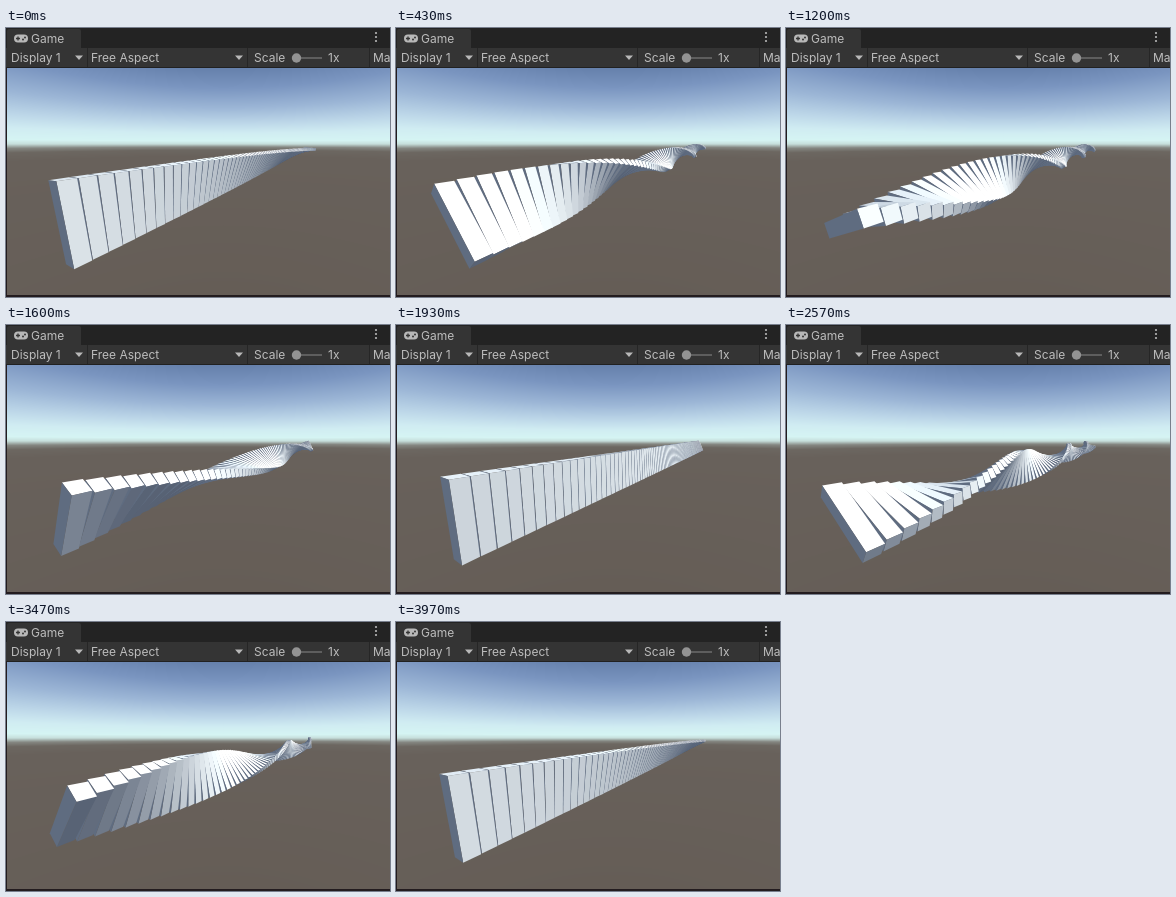
Animation, 384 px wide and 269 px high, one loop 4.01 s. Source, as an HTML page with a canvas:

```html
<!DOCTYPE html>
<html lang="en">
<head>
<meta charset="utf-8">
<title>Twisting planks</title>
<style>
  html, body { margin: 0; width: 100%; height: 100%; overflow: hidden; background: #231c1f; }
  canvas, svg { position: absolute; left: 0; top: 0; width: 384px; height: 269px; display: block; }
  text { font: 12px Inter, Roboto, sans-serif; fill: #bdbdbd; }
</style>
</head>
<body>
<canvas id="view" width="384" height="269"></canvas>
<svg viewBox="0 0 384 269">
  <rect width="384" height="20" fill="#232323"/>
  <path d="M1 20V3q0-2 2-2H73q2 0 2 2V20z" fill="#343434"/>
  <rect y="20" width="384" height="20" fill="#343434"/>
  <path d="M0 39.5H384" stroke="#212121"/>
  <path d="M81.500 20V39M241.500 20V39M363.500 20V39" stroke="#262626"/>
  <rect x="8" y="6.500" width="14" height="8" rx="4" fill="#b8b8b8"/>
  <path d="M10 10.500h4M12 8.500v4" stroke="#343434" stroke-width="1.300"/>
  <g fill="#343434"><circle cx="17" cy="11.500" r="1"/><circle cx="19" cy="9.500" r="1"/></g>
  <g fill="#b8b8b8">
    <path d="M69 27.500h8l-4 4.500zM229 27.500h8l-4 4.500z"/>
    <circle cx="370" cy="5" r="1.100"/><circle cx="370" cy="9" r="1.100"/><circle cx="370" cy="13" r="1.100"/>
  </g>
  <path d="M290 30H316" stroke="#5e5e5e" stroke-width="2"/>
  <circle cx="290.500" cy="30" r="4.700" fill="#939393"/>
  <text x="25" y="15">Game</text>
  <text x="5" y="34">Display 1</text>
  <text x="85" y="34">Free Aspect</text>
  <text x="248" y="34">Scale</text>
  <text x="322" y="34">1x</text>
  <text x="367" y="34">Maximize</text>
</svg>
<script>
const ctx = document.getElementById('view').getContext('2d');
const LOOP = 4010, FRAMES = 120, COUNT = 100;
const LENGTH = 5, THICK = 1, DEPTH = 0.94;

// Camera: focal length and centre in pixels, row vanishing point, near end of the row
const focal = 197, cx = 217.5, cy = 153, horizon = 116;
const vanish = [336, 111], near = [55.5, 197.5], nearZ = 10.8;

const dot = (a, b) => a[0] * b[0] + a[1] * b[1] + a[2] * b[2];
const cross = (a, b) => [a[1] * b[2] - a[2] * b[1], a[2] * b[0] - a[0] * b[2], a[0] * b[1] - a[1] * b[0]];
const unit = a => a.map(v => v / Math.hypot(...a));
const mix = (a, s, b, t) => a.map((v, i) => v * s + b[i] * t);
const add = (a, b, s) => mix(a, 1, b, s);
const ray = ([x, y]) => [(x - cx) / focal, (y - cy) / focal, 1];
const project = p => [cx + focal * p[0] / p[2], cy + focal * p[1] / p[2]];

const row = unit(ray(vanish));
const down = unit([0, focal, cy - vanish[1]]);
const side = cross(down, row);
const origin = ray(near).map(v => v * nearZ);

// Colours down the middle column; elsewhere the colour follows the elevation of the view ray
const sky = [
  [40, 101, 128, 171], [60, 122, 149, 192], [80, 156, 182, 214], [95, 188, 214, 232], [105, 208, 236, 242],
  [113, 213, 244, 243], [116, 198, 222, 219], [119, 132, 134, 129], [122, 108, 103, 97], [128, 104, 97, 91],
  [267, 101, 93, 86]
];

function skyColor(y) {
  const i = Math.max(1, sky.findIndex(stop => stop[0] >= y));
  const [a, b] = [sky[i - 1], sky[i]];
  const s = Math.max(0, (y - a[0]) / (b[0] - a[0]));
  return mix(a, 1 - s, b, s).slice(1);
}

function makeBackdrop() {
  const image = ctx.createImageData(383, 227);
  const pitch = Math.atan((cy - horizon) / focal);
  const up = [0, -Math.cos(pitch), -Math.sin(pitch)];
  for (let y = 0, n = 0; y < image.height; y++) {
    for (let x = 0; x < image.width; x++, n += 4) {
      const elevation = Math.asin(dot(unit(ray([x + 1.5, y + 40.5])), up));
      const level = cy - focal * Math.tan(elevation + pitch);
      image.data.set([...skyColor(Math.min(267, level)), 255], n);
    }
  }
  return image;
}
const backdrop = makeBackdrop();

const sunAngle = 46 * Math.PI / 180;

function shade(normal) {
  const across = dot(normal, side), up = -dot(normal, down);
  const sun = Math.max(0, across * Math.cos(sunAngle) + up * Math.sin(sunAngle));
  const channel = (base, sky, light) => Math.min(255, Math.round(base + sky * up + light * sun));
  return `rgb(${channel(95, 10, 167)},${channel(108, 13, 160)},${channel(128, 16, 140)})`;
}

// Quad around a centre, drawn only when it faces the camera
function face(center, normal, a, b) {
  if (dot(normal, center) >= 0) return;
  ctx.fillStyle = shade(normal);
  ctx.beginPath();
  for (const [s, t] of [[1, 1], [1, -1], [-1, -1], [-1, 1]]) {
    ctx.lineTo(...project(add(add(center, a, s), b, t)));
  }
  ctx.fill();
}

function plank(index, angle) {
  const c = Math.cos(angle), s = Math.sin(angle);
  const long = mix(down, c, side, s);
  const flat = mix(side, c, down, -s);
  const center = add(origin, row, index + DEPTH / 2);
  const halfRow = row.map(v => v * DEPTH / 2);
  const halfLong = long.map(v => v * LENGTH / 2);
  const halfFlat = flat.map(v => v * THICK / 2);
  for (const sign of [1, -1]) {
    face(add(center, halfFlat, sign), flat.map(v => v * sign), halfRow, halfLong);
    face(add(center, halfLong, sign), long.map(v => v * sign), halfRow, halfFlat);
  }
  face(add(center, halfRow, -1), row.map(v => -v), halfLong, halfFlat);
}

function draw(time) {
  ctx.fillStyle = '#231c1f';
  ctx.fillRect(0, 0, 384, 269);
  ctx.putImageData(backdrop, 1, 40);
  const turn = 3 + 360 * time / LOOP;
  const twist = -6.6 * Math.sin(2 * Math.PI * (time + 95) / LOOP);
  for (let i = COUNT - 1; i >= 0; i--) plank(i, (turn + twist * i) * Math.PI / 180);
}

const start = performance.now();
function tick() {
  const t = (performance.now() - start) % LOOP;
  // 30 steps a second, each starting on a multiple of 10 ms
  const step = Math.min(FRAMES - 1, Math.floor((t / 10 + 0.5) * 0.3));
  draw(step * LOOP / FRAMES);
  requestAnimationFrame(tick);
}
tick();
</script>
</body>
</html>
```
